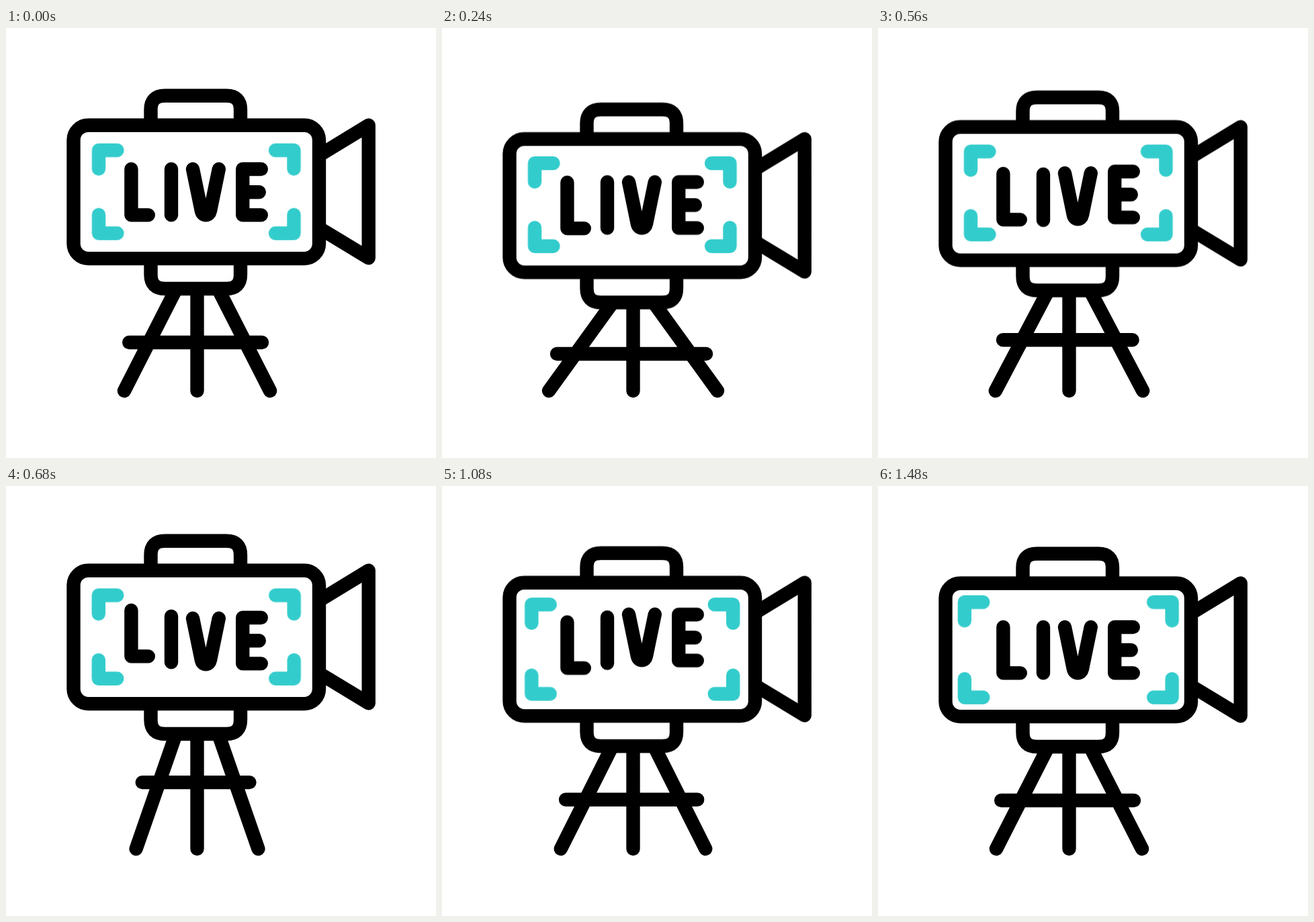
Recreate the animation shown at these times as an HTML page. Size 640 by 640 pixels, loop 1800 ms.

```html
<!DOCTYPE html>
<html lang="en">
<head>
<meta charset="utf-8">
<title>Live camera</title>
<style>
  html, body { margin: 0; width: 100%; height: 100%; overflow: hidden; background: #fff; }
  svg { display: block; width: 100%; height: 100%; }

  path, rect {
    fill: none;
    stroke: #000;
    stroke-width: 20.4;
    stroke-linecap: round;
    stroke-linejoin: round;
  }

  .body, .screen, .tripod, .letter, .corner {
    animation: 1800ms cubic-bezier(.333, 0, .667, 1) infinite;
  }

  /* Body, screen and tripod share one rhythm: sink, rise, settle. */
  .body { animation-name: body; }
  @keyframes body {
    0%, 1.11% { transform: translateY(0); }
    18.89%, 22.22% { transform: translateY(26.5px); }
    40%, 44.44% { transform: translateY(-21px); }
    62.22%, 100% { transform: translateY(0); }
  }

  .screen { animation-name: screen; }
  @keyframes screen {
    0%, 1.11% { transform: translateY(0); }
    18.89%, 22.22% { transform: translateY(25px); }
    40%, 44.44% { transform: translateY(-21px); }
    62.22%, 100% { transform: translateY(0); }
  }

  .tripod { animation-name: tripod; }
  @keyframes tripod {
    0%, 1.11%, 62.22%, 100% {
      d: path("M252 391L176 540M317 391L393 540M284.5 391L284.5 540M183.2 468L381 468");
    }
    18.89%, 22.22% {
      d: path("M252 417.5L154 540M317 417.5L415 540M284.5 417.5L284.5 540M167.4 490L396.6 490");
    }
    40%, 44.44% {
      d: path("M252 370L195.3 540M317 370L373.7 540M284.5 370L284.5 540M204.2 439L361 439");
    }
  }

  /* Letters hop one after another. */
  .letter { animation-name: hop; animation-delay: calc(var(--i) * 88ms); }
  @keyframes hop {
    0%, 10% { transform: translateY(0); }
    27.78%, 29.1% { transform: translateY(6px); }
    46.9%, 49.44% { transform: translateY(-18.3px); }
    67.22%, 100% { transform: translateY(0); }
  }

  /* Mirrored parents turn this into an outward move for every corner. */
  .corner { stroke: #3cc; animation-name: spread; }
  @keyframes spread {
    0%, 16.9% { transform: translate(0, 0); }
    34.7%, 46.1% { transform: translate(-9.3px, -9.3px); }
    63.9%, 100% { transform: translate(0, 0); }
  }
</style>
</head>
<body>
<svg viewBox="0 0 640 640">
  <defs>
    <path id="corner" class="corner" d="M-145.25 -34.25V-61.75H-117.75"/>
  </defs>

  <path class="tripod" d="M252 391L176 540M317 391L393 540M284.5 391L284.5 540M183.2 468L381 468"/>

  <g class="body">
    <rect x="100.5" y="144.7" width="365.5" height="198.4" rx="22"/>
    <path d="M215.5 144V121.5Q215.5 100.7 236.5 100.7H328Q349 100.7 349 121.5V144"/>
    <path d="M215.5 344V367Q215.5 388 236.5 388H328Q349 388 349 367V344"/>
    <path d="M466 189.6L539.7 144.7V342.3L466 297.6"/>
  </g>

  <g class="screen">
    <g transform="translate(283.25 243.75)">
      <use href="#corner"/>
      <use href="#corner" transform="scale(-1 1)"/>
      <use href="#corner" transform="scale(1 -1)"/>
      <use href="#corner" transform="scale(-1 -1)"/>
    </g>
    <path class="letter" style="--i:0" d="M186.4 210V278.4H211.8"/>
    <path class="letter" style="--i:1" d="M246 210V278.4"/>
    <path class="letter" style="--i:2" d="M278 210L290.8 272Q292.2 278.4 297.4 278.4Q302.6 278.4 304 272L316.8 210"/>
    <path class="letter" style="--i:3" d="M379.8 210H352.2V278.4H379.8M352.2 244.2H376.8"/>
  </g>
</svg>
</body>
</html>
```
